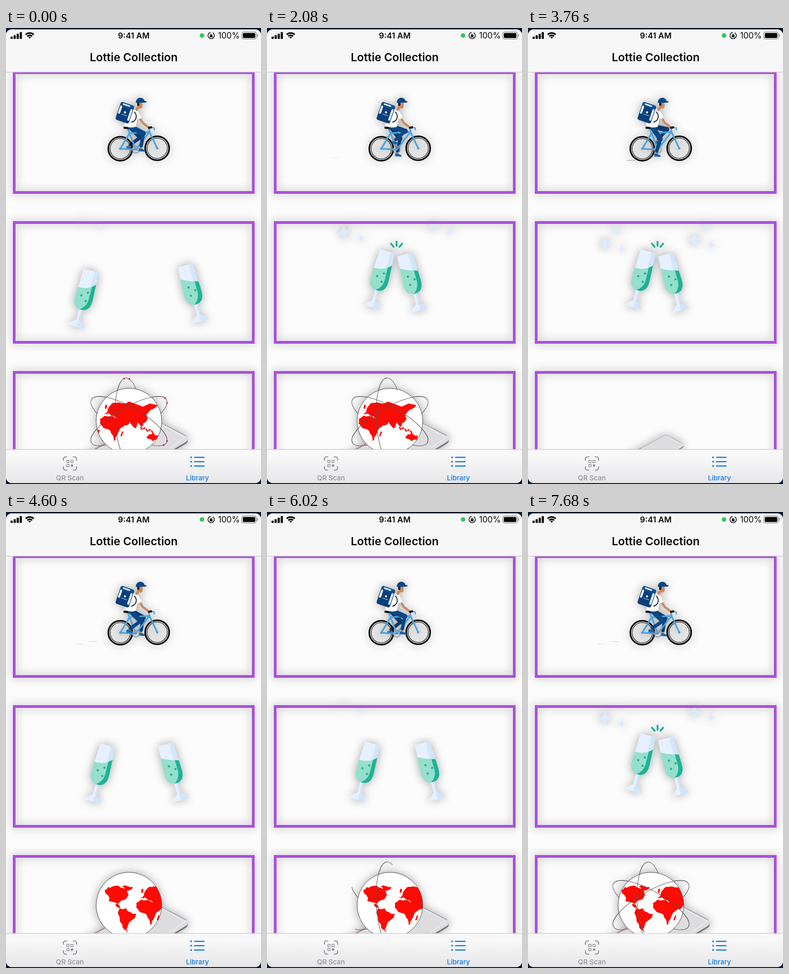
These frames come from a looping animation (560x1001 px, 7.78 s). An HTML page with a canvas:

```html
<!DOCTYPE html>
<html lang="en">
<head>
<meta charset="utf-8">
<title>Lottie Collection</title>
<style>
html, body { margin: 0; width: 100%; height: 100%; overflow: hidden; background: #0b1626; }
canvas { display: block; width: 100vw; height: 100vh; }
</style>
</head>
<body>
<canvas id="stage" width="560" height="1001"></canvas>
<script>
const W = 560, H = 1001, LOOP = 7780, TAU = Math.PI * 2, DEG = Math.PI / 180;
const screen2d = document.getElementById('stage').getContext('2d');
const layer = document.createElement('canvas');
layer.width = W;
layer.height = H;
const layer2d = layer.getContext('2d');
let c = layer2d;

const clamp = v => Math.max(0, Math.min(1, v));
const ramp = (t, a, b) => clamp((t - a) / (b - a));
const smooth = u => u * u * (3 - 2 * u);
const mix = (a, b, u) => a + (b - a) * u;
const between = (p, q, u) => [mix(p[0], q[0], u), mix(p[1], q[1], u)];
const polar = ([x, y], r, a) => [x + r * Math.cos(a), y + r * Math.sin(a)];

function fill(path, color) {
  c.fillStyle = color;
  c.fill(typeof path === 'string' ? new Path2D(path) : path);
}
function link(color, width, ...points) {
  c.strokeStyle = color;
  c.lineWidth = width;
  c.lineCap = c.lineJoin = 'round';
  c.beginPath();
  points.forEach(p => c.lineTo(...p));
  c.stroke();
}
function disc([x, y], r, color) {
  c.fillStyle = color;
  c.beginPath();
  c.arc(x, y, r, 0, TAU);
  c.fill();
}
function ring([x, y], r, color, width, from = 0, to = TAU) {
  c.strokeStyle = color;
  c.lineWidth = width;
  c.lineCap = 'butt';
  c.beginPath();
  c.arc(x, y, r, from, to);
  c.stroke();
}
function box(x, y, w, h, r, color) {
  c.fillStyle = color;
  c.beginPath();
  c.roundRect(x, y, w, h, r);
  c.fill();
}
function label(text, x, y, size, weight, color) {
  c.font = `${weight} ${size}px Inter, "Liberation Sans", sans-serif`;
  c.textAlign = 'center';
  c.fillStyle = color;
  c.fillText(text, x, y);
}
function at([x, y], turn, scale, draw) {
  c.save();
  c.translate(x, y);
  c.rotate(turn);
  c.scale(scale, scale);
  draw();
  c.restore();
}

// ---- Cyclist ----
const RIDE = 3050;
const NAVY = '#0b4785', SKY = '#4ba3dc', SKIN = '#c98b66', WHITE = '#fdfdfd';
const REAR = [251, 265], FRONT = [332, 264], CRANK = [285, 267];
const SEAT = [268, 222], STEM = [315, 228], GRIP = [314, 219];
const HIP = [272, 216], SHOULDER = [286, 185], HEAD = [295, 168];

function wheel(hub, turn) {
  for (let i = 0; i < 18; i++) link('#b9bcc0', .5, hub, polar(hub, 23, turn + i * TAU / 18));
  ring(hub, 26.3, '#0a0a0c', 3.6);
  ring(hub, 22.3, '#222', 1.3);
  disc(hub, 2.2, '#555');
}

function leg(angle, color) {
  const [px, py] = polar(CRANK, 14, angle);
  const ankle = [px - 3, py - 5], limb = 33.5;
  const dx = ankle[0] - HIP[0], dy = ankle[1] - HIP[1];
  const bend = Math.acos(clamp(Math.hypot(dx, dy) / (2 * limb)));
  const knee = polar(HIP, limb, Math.atan2(dy, dx) - bend);
  link(SKIN, 4, knee, ankle);
  link(color, 7.5, knee, between(knee, ankle, .82));
  link(color, 11, HIP, knee);
  fill(`M${px - 7} ${py - 5}h6l8 4v3l-14-1z`, '#1765b5');
}

function backpack() {
  box(-15.5, -20.5, 31, 41, 4, '#0a3f7b');
  box(-15.5, -20.5, 31, 9, 4, '#10518f');
  for (const side of [-1, 1]) link('#f4f7fa', 4.5, [side * 12, -10], [side * 12, side * 4 + 8]);
  link('#f4f7fa', 3, [-9, -17], [5, -17]);
  disc([0, -1], 2.3, '#f4f7fa');
  link('#b9cade', 1.2, [-6, 5], [6, 5]);
}

function cyclist(time) {
  const t = time % RIDE, turn = (10 + t / RIDE * 360) * DEG;

  // streaks left behind on the road
  for (const row of [0, 1]) {
    const age = t - 500 - row * 650;
    if (age < 0 || age > 1300) continue;
    const x = 233 - row * 21 - age * .074;
    c.globalAlpha = (1 - age / 1400) * (1 - row / 2);
    link('#a2a4a8', 1.6, [x, 290.5 - row * 6], [x + 20 - age / 150, 290.5 - row * 6]);
    c.globalAlpha = 1;
  }

  leg(turn + Math.PI, '#083a70');
  wheel(REAR, turn * 3);
  wheel(FRONT, turn * 3);
  link(SKY, 3.5, REAR, between(SEAT, CRANK, .2), STEM, CRANK, REAR);
  link(SKY, 3.5, SEAT, CRANK);
  link(SKY, 3.5, GRIP, STEM, FRONT);
  ring(CRANK, 7.5, '#8e9aab', 2);
  link('#7a8796', 2, CRANK, polar(CRANK, 14, turn));
  link('#111', 4.5, [260, 219], [273, 220]);
  link(SKY, 2.5, GRIP, [325, 219], [326, 224]);
  leg(turn, NAVY);

  fill('M279 178Q290 176 291 187L285 217Q272 221 260 214Q262 194 279 178Z', WHITE);
  const elbow = [300, 208];
  link(SKIN, 5, SHOULDER, elbow, GRIP);
  link(WHITE, 9, SHOULDER, between(SHOULDER, elbow, .45));
  link('#111', 4.5, GRIP, [319, 218]);

  link(SKIN, 6, [287, 179], [292, 171]);
  box(HEAD[0] - 5, HEAD[1] - 6, 10, 15, 5, SKIN);
  box(HEAD[0] - 7, HEAD[1] - 6, 5, 9, 2, '#2a1c18');
  c.save();
  c.beginPath();
  c.rect(280, 150, 30, 14);
  c.clip();
  disc([HEAD[0], 163], 10, NAVY);
  c.restore();
  link(NAVY, 3, [HEAD[0] - 8, 163], [HEAD[0] + 12, 162]);

  at([261, 186], 19 * DEG, 1, backpack);
  ring([273, 194], 13, '#15202c', 2, -50 * DEG, 80 * DEG);
}

// ---- Toast ----
const TOAST = 5500, TEAL = '#20b294';
const BOWL = new Path2D('M-17 0H17L20 64Q20 89 0 89T-20 64Z');
const FOOT = new Path2D('M-4 84H4V112L18 124V128H-18V124L-4 112Z');

function glass(x, y, side) {
  at([x, y], side * 15 * DEG, 1, () => {
    const lean = side * 8;
    const wine = new Path2D(`M-20 ${34 + lean}Q${side * 4} ${40 + lean / 2} 20 ${34 - lean}V92H-20Z`);
    for (const part of [FOOT, BOWL]) {
      c.save();
      c.clip(part);
      fill(part, '#e6f0fe');
      box(part === BOWL ? 8 : 1, 0, 24, 130, 0, '#d3e5fb');
      if (part === BOWL) {
        c.clip(wine);
        fill(wine, '#95dfcc');
        fill('M10 0H24V92H-10Q11 84 11 62Z', TEAL);
      }
      c.restore();
    }
    for (let i = 0; i < 3; i++) disc([side * (i % 2 ? -7 : 5.5), 49 + i * 9.5], 2.4, TEAL);
  });
}

function star(x, y, r) {
  const q = r * .2;
  c.beginPath();
  c.moveTo(x + r, y);
  for (let a = 1; a <= 4; a++) {
    c.quadraticCurveTo(...polar([x, y], q, (a - .5) * TAU / 4), ...polar([x, y], r, a * TAU / 4));
  }
  c.fillStyle = '#deebfd';
  c.fill();
}

function toast(time) {
  const p = (time + 300) % TOAST - 300;
  const near = smooth(ramp(p, -300, 1100)) * (1 - smooth(ramp(p, 4100, TOAST - 350)));
  glass(mix(177, 264, near), mix(538, 490, near), 1);
  glass(mix(406, 302, near), mix(524, 497, near), -1);

  const gone = 1 - ramp(p, 3950, 4250);
  c.globalAlpha = ramp(p, 1130, 1330) * gone;
  for (const a of [-130, -90, -50]) {
    link(TEAL, 4, polar([284.5, 488], 10, a * DEG), polar([284.5, 488], 19, a * DEG));
  }
  const lift = 1 - ramp(p, 1150, 2900);
  for (const right of [0, 1]) {
    for (const [x, y, r] of [[169, 473, 17], [194, 446, 11], [206, 485, 9]]) {
      const top = y - right * 8 - lift * (50 + right * 12);
      c.globalAlpha = ramp(top, 417, 447) * gone;
      star(x + right * 196, top, r);
    }
  }
  c.globalAlpha = 1;
}

// ---- Globe ----
const RESTART = 3600, RED = '#ff0a05', CENTER = [270, 863], RADIUS = 72;

// mulberry-style generator with a fixed seed
let seed = 7;
function random() {
  seed = (seed * 16807) % 2147483647;
  return seed / 2147483647;
}
// closed outline through a few key points, roughened by midpoint shifts
function coast(keys) {
  let points = keys.split(' ').map(k => k.split(',').map(Number));
  for (let pass = 0; pass < 2; pass++) {
    points = points.flatMap((p, i) => {
      const q = points[(i + 1) % points.length], k = (random() - .5) * .4;
      const [mx, my] = between(p, q, .5);
      return [p, [mx + (q[1] - p[1]) * k, my - (q[0] - p[0]) * k]];
    });
  }
  return new Path2D('M' + points.join('L') + 'Z');
}
const EURASIA = coast('214,847 226,832 240,823 270,820 333,828 318,838 308,848 312,858 302,867 298,877 290,866 283,879 272,864 256,876 247,862 240,854 228,847');
const AFRICA = coast('207,858 217,851 240,856 248,860 259,873 246,890 237,907 229,884 214,878 206,868');
const AUSTRALIA = coast('308,898 322,890 335,894 334,904 322,907');
const NORTH = coast('205,830 222,822 246,826 257,840 238,856 228,862 240,872 214,854');
const GREENLAND = coast('243,822 267,823 250,832');
const SOUTH = coast('237,871 252,870 274,882 256,908 255,924 244,906');

// same ellipse at three tilts, each with the time it starts to draw
const ORBITS = [[-94, 4400], [30, 5600], [-30, 5600]];
const LONG = 95, SHORT = 30;

function orbit(tilt, from, to) {
  if (to <= from) return;
  c.strokeStyle = '#55565a';
  c.lineWidth = 1.1;
  c.beginPath();
  c.ellipse(...CENTER, LONG, SHORT, tilt * DEG, from * DEG, to * DEG);
  c.stroke();
}

function land(shift) {
  c.save();
  c.beginPath();
  c.arc(...CENTER, RADIUS, 0, TAU);
  c.clip();
  c.translate(shift, 0);
  for (const part of [EURASIA, AFRICA, AUSTRALIA]) fill(part, RED);
  for (let i = 0; i < 5; i++) link(RED, 3, [296 + i * 6, 877 + i * 2], [299 + i * 6, 881 + i * 2 - i % 2 * 5]);
  link(RED, 3, [256, 887], [253, 895]);
  link(RED, 4, [220, 829], [219, 834]);
  c.translate(-RADIUS + 4, 0);
  for (const part of [NORTH, GREENLAND, SOUTH]) fill(part, RED);
  c.restore();
}

function handset(scale) {
  c.save();
  c.translate(283 * (1 - scale), 930 * (1 - scale));
  c.scale(scale, scale);
  const body = 'M316 858Q321 855 326 858L395 895Q403 901 396 908L330 948L150 990L160 945Z';
  c.translate(0, 4);
  fill(body, '#77787b');
  c.translate(0, -4);
  fill(body, '#dddde0');
  link('#8d8a8a', 1.4, [160, 945], [321, 857], [395, 895]);
  link('#f3f3f4', 1.3, [330, 863], [393, 899], [360, 922]);
  link('#c8696b', 1.2, [190, 927], [216, 913]);
  c.restore();
}

function globe(t) {
  const early = t < RESTART;
  const reach = start => 90 + 360 * (early ? 1 : ramp(t, start, start + 2000));
  const size = early ? 1 : smooth(ramp(t, 3740, 4400));

  handset(early ? 1 : mix(.15, 1, smooth(ramp(t, RESTART, 3960))));
  for (const [tilt, start] of ORBITS) orbit(tilt, 90, reach(start));
  at(between([280, 887], CENTER, size), 0, size, () => {
    c.translate(-CENTER[0], -CENTER[1]);
    disc(CENTER, RADIUS, '#fff');
    land(early ? -t * .0024 : 68 + (LOOP - 100 - t) * .0038);
    ring(CENTER, RADIUS, '#444', 1);
  });
  // the near half of each orbit passes in front
  for (const [tilt, start] of ORBITS) orbit(tilt, 180, Math.min(360, reach(start)));
  if (t > 900) return;
  for (const [tilt] of ORBITS) {
    for (const lead of [-8, 14]) {
      const a = (lead + t * .02) * DEG;
      at(CENTER, tilt * DEG, 1, () => disc([LONG * Math.cos(a), SHORT * Math.sin(a)], 1.8 - t / 600, '#e01512'));
    }
  }
}

// ---- Phone chrome ----
const INK = '#0a0a0a';

function statusBar() {
  for (let i = 0; i < 4; i++) box(10 + i * 6.7, 19 - i * 3.3, 4.8, 5 + i * 3.3, 1.2, INK);
  for (let i = 0; i < 3; i++) ring([52, 23.5], 2.5 + i * 5, INK, 3.4, -135 * DEG, -45 * DEG);
  label('9:41 AM', 280.5, 23, 17.8, 600, INK);
  disc([430.5, 16.5], 5, '#34c759');
  ring([450.5, 16.5], 7, INK, 1.6, -60 * DEG, 260 * DEG);
  box(447.5, 15.5, 6, 5, 1, INK);
  ring([450.5, 15.5], 1.9, INK, 1.2, Math.PI);
  label('100%', 489.5, 23, 18, 400, INK);
  box(517, 8, 33.5, 17, 5, '#8d8d8f');
  box(518.4, 9.4, 30.7, 14.2, 4, '#f7f7f7');
  box(520, 11, 27.5, 11, 2.5, INK);
  box(551.3, 13.5, 2, 6, 1, '#8d8d8f');
}

function tabBar() {
  const gray = '#929296', blue = '#0a7ae6';
  for (let i = 0; i < 4; i++) {
    at([140.5, 956], i * TAU / 4, 1, () => {
      link(gray, 2.2, [-14.5, -7], [-14.5, -11.5], [-11.5, -14.5], [-7, -14.5]);
      if (i === 2) box(-7, -7, 5, 5, 1, gray);
      else link(gray, 1.5, [-7, -7], [-2, -7], [-2, -2], [-7, -2], [-7, -7]);
    });
  }
  label('QR Scan', 140.5, 993, 15, 500, gray);
  for (let y = 942.5; y < 962; y += 9.5) {
    disc([406.5, y], 1.9, blue);
    link(blue, 2.4, [414, y], [435, y]);
  }
  label('Library', 420.5, 993, 15, 500, blue);
}

function bars() {
  const shade = c.createLinearGradient(0, 940, 0, H);
  shade.addColorStop(0, '#f8f8f8');
  shade.addColorStop(1, '#e6e6e9');
  box(0, 0, W, 97, 0, '#f7f7f7');
  box(0, 925, W, 76, 0, shade);
  for (const y of [96.5, 924.5]) box(0, y, W, 1, 0, '#bdbac0');
  statusBar();
  label('Lottie Collection', 280.5, 73, 24.6, 600, INK);
  tabBar();
}

function render(time) {
  // playback pauses for a moment at the end of every 840 ms
  const t = time - Math.max(0, (time + 20) % 840 - 740);

  c = layer2d;
  c.clearRect(0, 0, W, H);
  cyclist(t);
  toast(t);
  globe(t);
  c.strokeStyle = '#ab50db';
  c.lineWidth = 6;
  c.lineJoin = 'miter';
  for (let i = 0; i < 3; i++) c.strokeRect(18, 98 + i * 329, 525, 263);

  c = screen2d;
  box(0, 0, W, H, 0, '#08172e');
  c.save();
  c.beginPath();
  c.roundRect(0, 3, W, 996, 13);
  c.clip();
  box(0, 0, W, H, 0, '#fcfcfc');
  c.save();
  c.shadowColor = 'rgba(0,0,0,.34)';
  c.shadowBlur = 20;
  c.drawImage(layer, 0, 0);
  c.restore();
  bars();
  c.restore();
}

const began = performance.now();
function tick() {
  render((performance.now() - began) % LOOP);
  requestAnimationFrame(tick);
}
tick();
</script>
</body>
</html>
```
